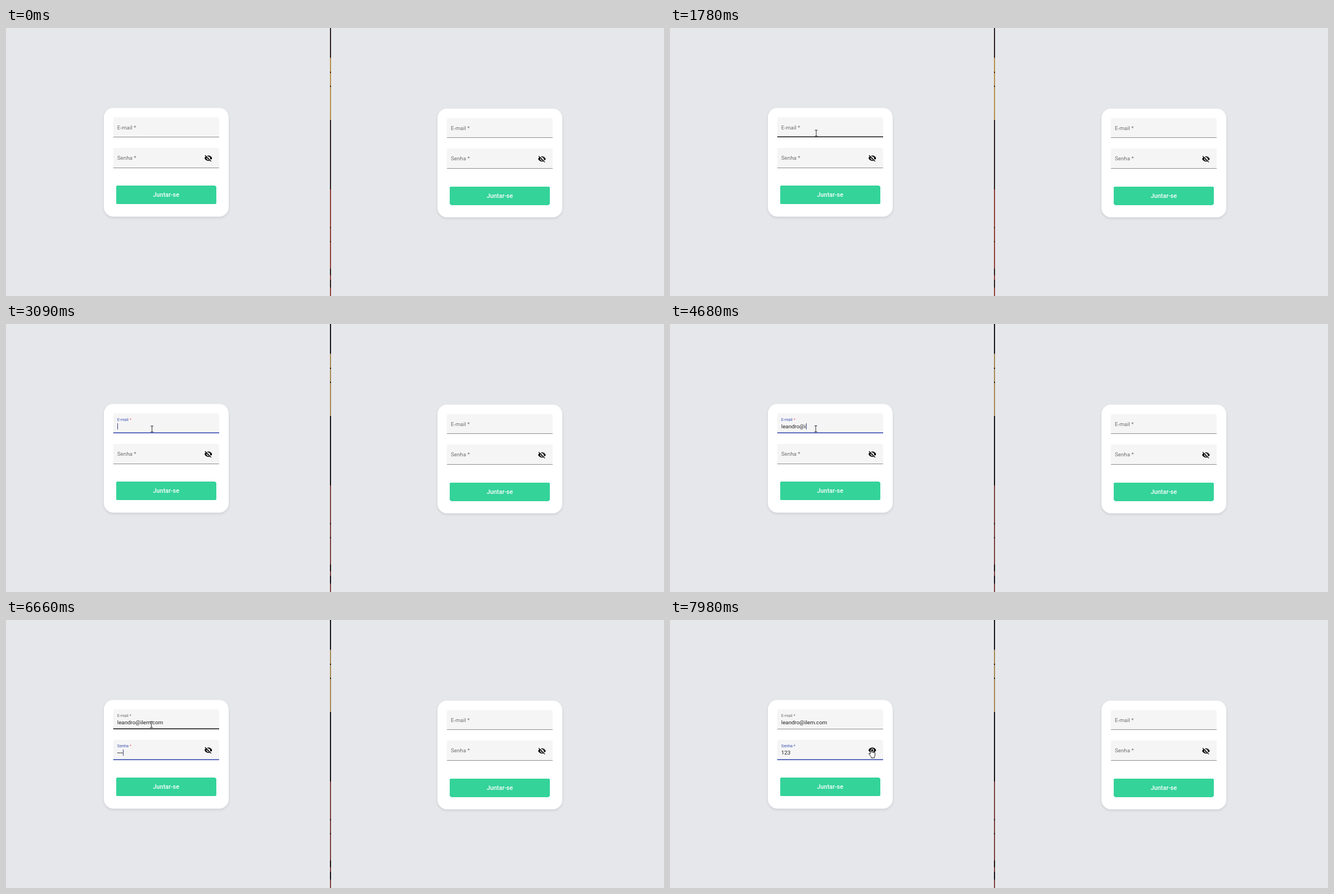
An HTML page that plays this animation: 1170x478 px, repeating every 8000 ms.

```html
<!DOCTYPE html>
<html lang="pt">
<head>
<meta charset="utf-8">
<title>Login</title>
<style>
html, body { margin: 0; width: 100%; height: 100%; overflow: hidden; background: #e5e7eb; }
svg { display: block; width: 1170px; height: 478px; }
text { font-family: Roboto, Arial, sans-serif; font-size: 9.75px; white-space: pre; }
.card { fill: #fff; filter: drop-shadow(0 2px 2px rgba(0, 0, 0, .11)); }
.fill { fill: #f5f5f5; }
.line { fill: #8c8c8c; }
.line, .join, .caret { shape-rendering: crispEdges; }
.join { fill: #34d399; }
.label { fill: #6e6e6e; }
.value { fill: #212121; }
.caret { fill: #3a4486; }
.action { fill: #fff; font-size: 10.9px; font-weight: 500; text-anchor: middle; }
</style>
</head>
<body>
<svg viewBox="0 0 1170 478">
  <defs>
    <g id="box">
      <path class="fill" d="M0 35.5V3a3 3 0 0 1 3-3H185.3a3 3 0 0 1 3 3V35.5Z"/>
      <rect class="line" y="35" width="188.3" height="1"/>
    </g>
    <path id="eye" fill-rule="evenodd" d="M1 12C2.73 7.61 7 4.5 12 4.5S21.27 7.61 23 12C21.27 16.39 17 19.5 12 19.5S2.73 16.39 1 12ZM7 12a5 5 0 0 0 10 0a5 5 0 0 0 -10 0ZM9 12a3 3 0 0 0 6 0a3 3 0 0 0 -6 0Z"/>
    <g id="hidden">
      <use href="#eye"/>
      <path d="M4 2L22 20" stroke="#f5f5f5" stroke-width="2.4"/>
      <path d="M2.6 3.6L20.4 21.4" stroke="#000" stroke-width="1.9"/>
    </g>
    <g id="form">
      <rect class="card" x="174" y="142.5" width="222" height="194" rx="17"/>
      <use href="#box" x="190.7" y="159.1"/>
      <use href="#box" x="190.7" y="213.8"/>
      <rect class="join" x="196" y="281.2" width="177.7" height="33.2" rx="3"/>
      <text class="action" x="284.8" y="301.3">Juntar-se</text>
    </g>
  </defs>

  <g id="divider"></g>

  <use href="#form"/>
  <g id="fields"></g>
  <use id="icon" href="#hidden" transform="translate(352.3 224.8) scale(.62)"/>

  <g transform="translate(593.2 1.3)">
    <use href="#form"/>
    <text class="label" x="197.8" y="181">E-mail *</text>
    <text class="label" x="197.8" y="235">Senha *</text>
    <use href="#hidden" transform="translate(352.3 224.8) scale(.62)"/>
  </g>

  <g id="pointer">
    <path id="arrow" transform="scale(.7)" d="M.5 .5V16.5L4.2 13L6.6 18.6L9 17.5L6.6 12.2H11.6Z" fill="#fff" stroke="#000" stroke-width="1.2"/>
    <path id="beam" d="M-2.5 -5.3H2.5M0 -5.3V5.3M-2.5 5.3H2.5" fill="none" stroke="#333"/>
    <path id="hand" transform="translate(-4.6 -.8) scale(.7)" d="M5 12V2.6a1.5 1.5 0 0 1 3 0V8a1.5 1.5 0 0 1 3 .3a1.5 1.5 0 0 1 3 .6a1.4 1.4 0 0 1 2.8 .8V15q0 2.5-1.5 4.5V22H7.5V20Q5 17 3.4 14.4Q1 11.6 1.6 10.8Q2.8 9.8 5 12Z" fill="#fff" stroke="#000" stroke-width="1.3"/>
  </g>
</svg>
<script>
const LOOP = 8000, SVG = 'http://www.w3.org/2000/svg';
const MAIL = 'leandro@ilem.com', PASS = '123';
const FOCUS_MAIL = 2090, FOCUS_PASS = 5625, REVEAL = 7460;
const TYPO = 3140, ERASE = 3390, LEAVE_MAIL = 6720;

// evenly paced key strokes
const run = (start, step, n) => Array.from({ length: n }, (_, i) => start + i * step);
const mailKeys = [...run(3500, 116, 7), ...run(4510, 121, 9)];
const passKeys = run(5950, 172, 3);
const caretResets = [FOCUS_MAIL, TYPO, ERASE, ...mailKeys, FOCUS_PASS, ...passKeys, REVEAL + 15];

// time, x, y of the pointer tip
const path = [
  [650, 1091, 464], [1050, 499, 315], [1400, 272, 215], [1750, 260, 187.5],
  [6650, 258.6, 186.5], [6930, 316, 276], [7100, 347, 238.5],
  [7450, 361, 224], [7650, 361, 224], [7750, 357.3, 231.3]
];

const $ = id => document.getElementById(id);
const set = (el, attrs) => {
  for (const k in attrs) el.setAttribute(k, attrs[k]);
  return el;
};
const make = (name, attrs, parent) =>
  set(parent.appendChild(document.createElementNS(SVG, name)), attrs);
const clamp = v => Math.min(1, Math.max(0, v));
const count = (times, t) => times.filter(k => k <= t).length;

// cubic-bezier(.25, .8, .25, 1)
function ease(x) {
  let a = 0, b = 1, s = .5;
  for (let i = 0; i < 18; i++) {
    s = (a + b) / 2;
    if (.75 * s * (1 - s) + s ** 3 < x) a = s; else b = s;
  }
  return 2.4 * s * (1 - s) ** 2 + 3 * s * s * (1 - s) + s ** 3;
}
const since = (t, start, span) => t <= start ? 0 : t >= start + span ? 1 : ease((t - start) / span);
const mix = (a, b, p) => `rgb(${a.map((v, i) => Math.round(v + (b[i] - v) * p))})`;
const GREY = [110, 110, 110], BLUE = [63, 81, 181], PINK = [255, 90, 110], DARK = [33, 33, 33];

// photo strip between the two windows
const tones = {
  dark: ['#2c1f1c', '#17120f'], gold: ['#b8904a', '#a68a55'], red: ['#943f36', '#7c403c']
};
const strip = [];
function band(tone, y, height) {
  strip.push({ tone, el: make('rect', { x: 576, y, width: 2, height }, $('divider')) });
}
band('dark', 0, 478);
band('gold', 53, 111);
band('red', 288, 141);
band('red', 441, 8);
band('red', 463, 15);
for (const y of [78, 355]) run(y, 25, 2).forEach(nick => band('dark', nick, 2));

function field(name, y, lineY) {
  const g = $('fields');
  const label = make('text', { class: 'label' }, g);
  const word = make('tspan', {}, label), star = make('tspan', {}, label);
  word.textContent = name;
  star.textContent = ' *';
  return {
    y, label, word, star,
    ripple: make('rect', { y: lineY - .7, height: 1.6 }, g),
    value: make('text', { class: 'value', x: 197.8, y: y + 5 }, g),
    caret: make('rect', { class: 'caret', y: y - 4, width: 1, height: 11 }, g)
  };
}
const mail = field('E-mail', 181, 194), pass = field('Senha', 235, 249);

function drawField(f, { lift, tint, star, text, caret, line, lineColor, lineAlpha }) {
  set(f.label, { transform: `translate(197.8 ${f.y - 7.8 * lift}) scale(${1 - .25 * lift})` });
  set(f.word, { fill: mix(GREY, BLUE, tint) });
  set(f.star, { fill: mix(GREY, star, tint) });
  f.value.textContent = text;
  const end = text ? f.value.getComputedTextLength() : 0;
  set(f.caret, { x: Math.round(198 + end), opacity: caret ? 1 : 0 });
  const width = 188.3 * line;
  set(f.ripple, { x: 284.85 - width / 2, width, fill: lineColor, opacity: lineAlpha });
}

function pointerAt(t) {
  const i = Math.max(1, path.findIndex(p => p[0] > t));
  if (t >= path[path.length - 1][0]) return path[path.length - 1].slice(1);
  const [a, b] = [path[i - 1], path[i]];
  const p = clamp((t - a[0]) / (b[0] - a[0]));
  return [a[1] + (b[1] - a[1]) * p, a[2] + (b[2] - a[2]) * p];
}

function drawPointer(t) {
  const [x, y] = pointerAt(Math.floor(t / 50) * 50);
  const inside = (l, top, r, bottom) => x > l && x < r && y > top && y < bottom;
  const inPass = inside(190, 213, 379, 249);
  const kind = inPass && x > 352 ? 'hand' : inPass || inside(190, 159, 379, 195) ? 'beam' : 'arrow';
  set($('pointer'), { transform: `translate(${x} ${y})`, opacity: t < 650 ? 0 : 1 });
  for (const k of ['arrow', 'beam', 'hand']) $(k).style.display = k === kind ? '' : 'none';
}

function draw(t) {
  strip.forEach(s => set(s.el, { fill: tones[s.tone][t < 2230 ? 0 : 1] }));

  const last = caretResets.filter(k => k <= t).pop();
  const blink = last !== undefined && Math.floor((t - last) / 500) % 2 === 0;
  const onPass = t >= FOCUS_PASS, shown = t >= REVEAL;
  const typo = t >= TYPO && t < ERASE ? 'e' : '';
  const leaving = 1 - since(t, FOCUS_PASS, 250);

  drawField(mail, {
    lift: since(t, FOCUS_MAIL, 400),
    tint: since(t, FOCUS_MAIL, 400) * leaving,
    star: PINK,
    text: typo || MAIL.slice(0, count(mailKeys, t)),
    caret: blink && !onPass,
    line: 1,
    lineColor: mix(DARK, BLUE, since(t, FOCUS_MAIL, 300) * leaving),
    lineAlpha: t < LEAVE_MAIL ? since(t, 1480, 600) : 0
  });

  const n = count(passKeys, t);
  const hover = t < 1440 ? since(t, 1260, 600) : 0;
  drawField(pass, {
    lift: since(t, FOCUS_PASS, 400),
    tint: clamp((t - FOCUS_PASS - 100) / 250),
    star: shown ? BLUE : PINK,
    text: shown ? PASS.slice(0, n) : '•'.repeat(n),
    caret: blink && onPass,
    line: onPass ? .5 + .5 * since(t, FOCUS_PASS, 300) : 1,
    lineColor: mix(DARK, BLUE, onPass ? 1 : 0),
    lineAlpha: onPass ? clamp((t - FOCUS_PASS) / 100) : hover
  });

  set($('icon'), { href: shown ? '#eye' : '#hidden' });
  drawPointer(t);
}

const start = performance.now();
function tick(now) {
  draw(Math.max(0, now - start) % LOOP);
  requestAnimationFrame(tick);
}
draw(0);
requestAnimationFrame(tick);
</script>
</body>
</html>
```
